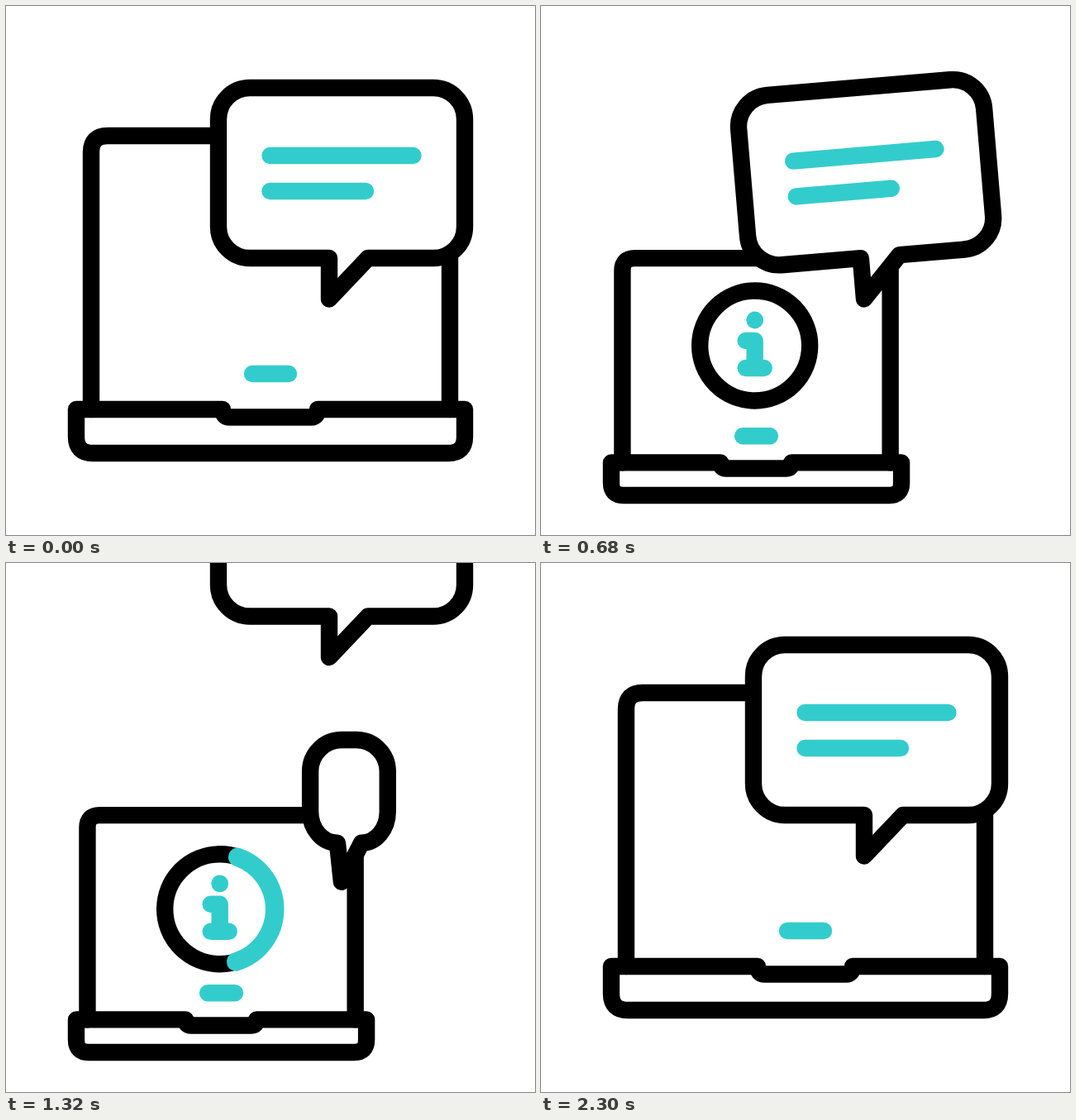
Animation, 640 px wide and 640 px high, one loop 2400 ms. Source, as an HTML page:

```html
<!DOCTYPE html>
<html>
<head>
<meta charset="utf-8">
<style>
  html, body { margin: 0; width: 100%; height: 100%; overflow: hidden; background: #fff; }
  svg { display: block; width: 100%; height: 100%; }
  path, circle { fill: none; stroke: #000; stroke-width: 20.4; stroke-linecap: round; stroke-linejoin: round; }
  .accent { stroke: #3cc; }
  .bubble { fill: #fff; }
  #laptop path { vector-effect: non-scaling-stroke; }
  #arc { stroke-width: 22.5; }
  #dot { fill: #3cc; stroke: none; }
</style>
</head>
<body>
<svg viewBox="0 0 640 640">
  <g id="laptop">
    <path d="M18-53V-364q0-20 20-20H432q20 0 20 20V-53"/>
    <path d="M177-53H0V-20Q0 0 20 0H450Q470 0 470-20V-53H292q0 9.5-8 9.5H186q-9 0-9-9.5"/>
    <path class="accent" d="M213-96h44"/>
  </g>
  <g id="info">
    <circle r="66.5"/>
    <path id="arc" class="accent" pathLength="1" d="M0 66.5A66.5 66.5 0 0 1 0-66.5A66.5 66.5 0 0 1 0 66.5"/>
    <circle id="dot" cy="-31" r="10.4"/>
    <path class="accent" d="M-11-6H0V27M-11 27H11"/>
  </g>
  <g id="leaving">
    <path class="bubble"/>
    <path class="accent" d="M319.5 181H492.5M319.5 224H435"/>
  </g>
  <g id="arriving">
    <path class="bubble"/>
    <path class="accent"/>
  </g>
</svg>
<script>
const LOOP = 2400;
const $ = selector => document.querySelector(selector);
const set = (selector, name, value) => $(selector).setAttribute(name, value);
const show = (selector, visible) => set(selector, 'visibility', visible ? 'visible' : 'hidden');
const lerp = (a, b, p) => a + (b - a) * p;

function ease(t, start, end) {
  const x = Math.min(1, Math.max(0, (t - start) / (end - start)));
  return x * x * (3 - 2 * x);
}

// Eased value along [time, value] keys.
function track(t, ...keys) {
  return keys.slice(1).reduce((value, [time, next], i) =>
    t < keys[i][0] ? value : lerp(keys[i][1], next, ease(t, keys[i][0], time)), keys[0][1]);
}

// Speech bubble from narrow (p = 0) to full width (p = 1).
function bubblePath(p) {
  const left = lerp(369, 257, p), right = lerp(461, 555, p);
  const top = lerp(215, 99, p), bottom = lerp(339, 305, p);
  const tailLeft = lerp(401, 391, p), tailRight = lerp(430, 438, p);
  const tipX = lerp(406, 391, p), tipY = lerp(386, 354.5, p);
  const r = 38, rl = Math.min(r, tailLeft - left), rr = Math.min(r, right - tailRight);
  return `M${tailLeft} ${bottom}H${left + rl}A${rl} ${r} 0 0 1 ${left} ${bottom - r}
    V${top + r}A${r} ${r} 0 0 1 ${left + r} ${top}H${right - r}A${r} ${r} 0 0 1 ${right} ${top + r}
    V${bottom - r}A${rr} ${r} 0 0 1 ${right - rr} ${bottom}H${tailRight}L${tipX} ${tipY}Z`;
}

const textLine = (y, length, p) => p > 0 ? `M319.5 ${y}h${length * p}` : '';

function draw(t) {
  const shrink = ease(t, 0, 500) - ease(t, 2000, 2300);
  set('#laptop', 'transform', `translate(85 ${lerp(541, 592, shrink)}) scale(${lerp(1, 0.747, shrink)})`);

  const size = ease(t, 400, 600) - ease(t, 1600, 1800);
  const infoY = track(t, [700, 411], [900, 401], [1200, 421], [1600, 411]);
  show('#info', size > 0);
  set('#info', 'transform', `translate(258.7 ${infoY}) scale(${size})`);

  const arcStart = ease(t, 1000, 1600), arcEnd = ease(t, 800, 1400);
  set('#arc', 'display', arcEnd > arcStart ? 'inline' : 'none');
  set('#arc', 'stroke-dasharray', `${arcEnd - arcStart} 2`);
  set('#arc', 'stroke-dashoffset', -arcStart);

  const tilt = track(t, [100, 0], [400, 10], [700, -5], [900, 0]);
  show('#leaving', t < 1600);
  set('#leaving', 'transform', `translate(0 ${-370 * ease(t, 900, 1600)}) rotate(${tilt} 390.5 354.5)`);

  const pop = ease(t, 1100, 1300);
  show('#arriving', pop > 0);
  set('#arriving', 'transform', `translate(406 386) scale(${pop}) translate(-406 -386)`);
  set('#arriving .bubble', 'd', bubblePath(ease(t, 1300, 1700)));
  set('#arriving .accent', 'd',
    textLine(181, 173, ease(t, 1800, 2100)) + textLine(224, 115.5, ease(t, 2000, 2300)));
}

set('#leaving .bubble', 'd', bubblePath(1));
const begin = performance.now();
function tick() {
  draw((performance.now() - begin) % LOOP);
  requestAnimationFrame(tick);
}
tick();
</script>
</body>
</html>
```
